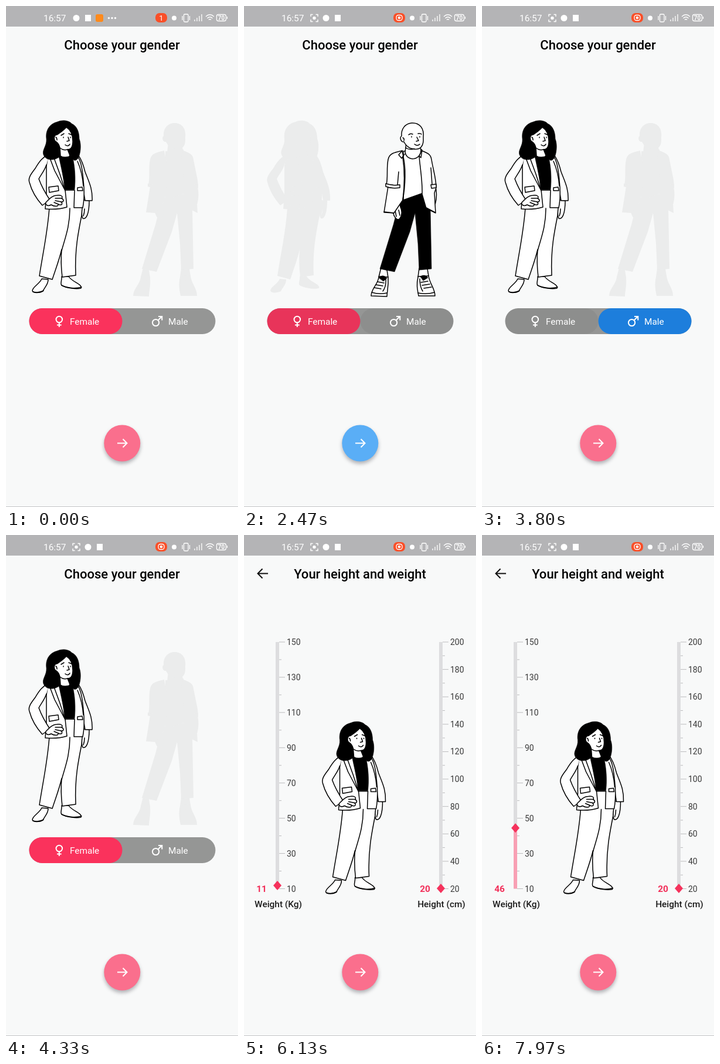
Animation, 396 px wide and 852 px high, one loop 8 s. Source, as an HTML page:

```html
<!DOCTYPE html>
<html lang="en">
<head>
<meta charset="utf-8">
<title>Gender and body measures</title>
<style>
  html, body { margin: 0; width: 100%; height: 100%; overflow: hidden; background: #f8f9f9; }
  svg { display: block; width: 100%; height: 100%; font: 15.4px Roboto, sans-serif; }
  .title { font-size: 22px; font-weight: 500; text-anchor: middle; }
  .caption { font-weight: 500; fill: #1c1c1c; text-anchor: middle; }
  .value { font-weight: 700; fill: #f2305a; text-anchor: middle; }
  .scale { font-size: 14px; fill: #3a3a3a; }
  .line { fill: none; stroke-width: 2; }
  .figure { --paper: #fff; --ink: #000; --line: #000; }
  .shade { --paper: #ebecec; --ink: #ebecec; --line: none; }
  .body, .solid, .ink { stroke: var(--line); stroke-width: 1.5; stroke-linejoin: round; stroke-linecap: round; }
  .body { fill: var(--paper); }
  .solid { fill: var(--ink); stroke-width: .6; }
  .ink { fill: none; }
  #fab { filter: drop-shadow(0 4px 3px rgba(90, 90, 100, .45)); }
</style>
</head>
<body>
<svg viewBox="0 0 396 852" preserveAspectRatio="none">
  <defs>
    <g id="woman">
      <path class="body" d="M61 464C57 473 46 477 45 484C46 489 58 488 63 485C66 478 72 474 72 465Z"/>
      <path class="body" d="M95 460C96 466 92 472 95 475C104 480 120 482 128 480C131 473 112 469 107 460Z"/>
      <path class="ink" d="M46 486C53 488 59 487 64 484M95 475C105 480 119 481 129 478" stroke-width="2"/>
      <path class="body" d="M74 343C71 385 63 420 57 459L79 465C86 444 91 431 95 414Q93 436 96 461L119 458C117 415 123 385 132 342L117 313H100Z"/>
      <path class="ink" d="M109 344C109 375 101 394 95 416"/>
      <path class="body" d="M131 330C131 344 127 356 131 361C137 364 142 353 142 331ZM134 345Q134 352 132 357"/>
      <path class="body" d="M122 252C129 260 132 270 135 282C141 298 148 310 147 331L135 331L130 300L119 262Z"/>
      <path class="body" d="M72 254L69 272V318L67 345Q88 347 104 342L101 313H117L116 343H131Q134 328 133 308C131 282 129 262 120 253L90 254Z"/>
      <path class="ink" d="M75 259L83 280L101 314M81 256L92 286L101 314M122 264Q130 282 132 306"/>
      <path class="body" d="M73 308L89 306L90 314L74 317ZM122 309L130 308L131 314H122Z"/>
      <path class="body" d="M74 252C62 256 55 268 50 276C44 284 37 292 40 300C44 315 53 329 62 339L75 330C67 318 60 305 56 294C60 286 66 280 69 270"/>
      <path class="body" d="M68 334C74 328 79 322 87 322C94 321 98 324 95 327C100 330 98 334 94 333C98 337 94 340 89 337C90 342 82 341 77 338C72 341 67 339 68 334Z"/>
      <path class="ink" d="M84 327L95 327M84 331L94 333M82 334L89 337"/>
      <path class="solid" d="M88 197C96 193 108 195 112 200C121 204 125 214 125 226C129 236 127 250 124 257C120 265 114 264 112 256H92C82 264 68 263 64 253C61 245 70 238 69 226C67 212 74 200 88 197Z"/>
      <path class="body" d="M103 206C98 212 93 215 87 219C81 219 81 229 86 231C89 233 91 237 92 241L93 255C98 259 108 259 109 254L105 244C112 244 114 238 114 230C114 219 111 211 103 206Z" stroke-width="1"/>
      <path class="ink" d="M94 220L99 217M107 217L112 219M106 223L108 229L104 230M101 236Q106 240 109 235M93 242Q98 246 105 244M85 223Q87 224 87 228" stroke-width="1.2"/>
      <path class="ink" d="M98 223v1M110 223v1" stroke-width="2.2"/>
      <path class="solid" d="M90 255Q102 259 113 254C118 273 119 295 117 312H100C99 294 94 274 90 255Z"/>
    </g>
    <g id="man">
      <path class="body" d="M234 445L230 461C229 473 217 481 217 493L244 494C244 485 247 478 246 462L244 449Z"/>
      <path class="body" d="M299 446L297 461C294 474 296 482 298 493L326 493C326 480 317 473 315 459L313 447Z"/>
      <path class="ink" d="M218 487Q231 491 244 488M230 460L246 461M228 469L239 471M225 474L237 476M222 479L234 481M242 464Q243 477 237 485M297 488Q312 491 325 487M297 460L315 459M302 470L314 468M304 475L317 473M307 480L320 478M300 464Q300 477 305 485"/>
      <path class="solid" d="M230 462Q237 455 244 463L238 468ZM301 460Q308 455 314 462L306 467Z"/>
      <path class="solid" d="M268 327L304 319L318 343L320 447L299 449L297 404L292 352L283 384L257 452L232 447L255 372L262 345Z"/>
      <path class="body" d="M247 305C250 320 248 338 254 344C253 354 259 364 264 363C269 359 271 350 267 342L261 305ZM258 348L260 358M264 347L266 356"/>
      <path class="body" d="M322 306L328 312Q330 330 324 343Z"/>
      <path class="body" d="M272 247L303 244L306 318L272 330Z"/>
      <path class="body" d="M303 246C313 250 319 252 320 261C323 279 328 294 328 309L325 318L327 352L311 344L304 320C305 297 300 272 299 255Z"/>
      <path class="body" d="M270 246C258 249 248 250 246 261C243 276 246 291 243 304L246 307L239 351L256 352L271 330C276 303 276 274 272 257Z"/>
      <path class="body" d="M242 302Q254 306 266 304L266 309Q252 311 242 307ZM319 304L328 303V309L320 310Z"/>
      <path class="ink" d="M264 282L262 304M271 257Q276 292 271 330M270 246L264 253L269 259L274 252M304 245L302 258L297 253M319 275L321 303M239 350L256 352M311 343L326 351" stroke-width="1.8"/>
      <path class="body" d="M277 232L275 249C278 264 300 264 302 246L301 239Z"/>
      <path class="body" d="M286 199C275 200 268 209 269 221C265 224 268 232 273 231Q278 241 288 243C302 246 307 237 306 224C308 207 299 198 286 199Z"/>
      <path class="ink" d="M276 241Q281 245 291 243M271 224Q274 225 273 229M281 219Q284 216 288 218M297 217Q301 216 303 218M295 223L298 229L294 230M291 235Q296 239 300 235" stroke-width="1.2"/>
      <path class="ink" d="M286 222v1M300 222v1" stroke-width="2.2"/>
    </g>
  </defs>

  <rect width="396" height="852" fill="#f8f9f9"/>
  <g id="choosePage">
    <text class="title" x="198" y="74">Choose your gender</text>
    <use id="him" href="#man"/>
    <rect x="39.5" y="514" width="318" height="44" rx="22" fill="#959695"/>
    <rect id="femalePill" x="39.5" y="514" width="159" height="44" rx="22"/>
    <rect id="malePill" x="198.5" y="514" width="159" height="44" rx="22"/>
    <g fill="#fff">
      <text x="109" y="542">Female</text>
      <text x="277" y="542">Male</text>
    </g>
    <path class="line" stroke="#fff" d="M85.5 533a5.3 5.3 0 1 0 10.6 0a5.3 5.3 0 1 0-10.6 0M90.8 538.5V546M87 542.5H94.6M250 538.5a5.6 5.6 0 1 0 11.2 0a5.6 5.6 0 1 0-11.2 0M259.5 534.5L266 528M260 528H266.3V534.5"/>
  </g>

  <g id="measurePage">
    <rect width="396" height="852" fill="#f8f9f9"/>
    <path class="line" stroke="#111" d="M41 65.5H24M31.5 57.5L23.5 65.5L31.5 73.5"/>
    <text class="title" x="198" y="74">Your height and weight</text>
    <g id="rulers"></g>
    <rect id="fill" x="54" width="6" fill="#f8a0b4"/>
    <path id="marker" d="M0-8L7 0L0 8L-7 0Z" fill="#f5325c"/>
    <path d="M336 593L343 601L336 609L329 601Z" fill="#f5325c"/>
    <text id="weight" class="value" x="30" y="607"></text>
    <text class="value" x="309" y="607">20</text>
    <text class="caption" x="58.5" y="633">Weight (Kg)</text>
    <text class="caption" x="337" y="633">Height (cm)</text>
  </g>

  <use id="her" href="#woman"/>
  <circle id="fab" cx="198.3" cy="743.5" r="31"/>
  <path class="line" stroke="#fff" d="M190 743.5H206M199.5 736.5L206.5 743.5L199.5 750.5"/>

  <rect width="396" height="35" fill="#b4b4b6"/>
  <g fill="#fff">
    <text x="64" y="26">16:57</text>
    <g id="notices">
      <circle cx="140" cy="20.5" r="5.5"/>
      <rect x="155" y="15" width="10" height="11"/>
    </g>
    <g id="moreNotices">
      <rect x="153" y="14" width="13" height="13" rx="3" fill="#ff8a1c"/>
      <circle cx="175.5" cy="20.5" r="1.7"/><circle cx="181" cy="20.5" r="1.7"/><circle cx="186.5" cy="20.5" r="1.7"/>
    </g>
    <g id="recordNotice">
      <circle cx="120" cy="20.5" r="2.7"/>
      <path fill="none" stroke="#fff" stroke-width="1.4" d="M114 18V14.5H117.5M122.5 14.5H126V18M126 23V26.5H122.5M117.5 26.5H114V23"/>
    </g>
    <rect x="255" y="12" width="20" height="16" rx="7" fill="#f94f28"/>
    <text id="countdown" x="265" y="25" font-size="13" text-anchor="middle">1</text>
    <g id="recording" fill="none" stroke="#fff" stroke-width="1.3">
      <rect x="260" y="15.5" width="10" height="9" rx="3.5"/>
      <circle cx="265" cy="20" r="1.7" fill="#fff"/>
    </g>
    <circle cx="287" cy="20.5" r="4"/>
    <g fill="none" stroke="#fff" stroke-width="1.3">
      <rect x="303.5" y="14" width="7.5" height="13" rx="1.5"/>
      <path d="M301 17V24M313.5 17V24M322 23V26M326 20V26M330 17V26M334 14V26"/>
      <path d="M341 18Q348 11.5 355 18M343.5 21Q348 16.5 352.5 21M346 23.5Q348 21.5 350 23.5"/>
      <rect x="359.5" y="14.5" width="16" height="11" rx="3"/>
      <path d="M377.5 18V22"/>
    </g>
    <text x="367.5" y="24" font-size="10" font-weight="700" text-anchor="middle">70</text>
  </g>
  <rect y="851" width="396" height="1" fill="#c4c4c6"/>
</svg>
<script>
  const LOOP = 8000, TOP = 182, BOTTOM = 601.5;
  const RED = [250, 50, 92], BLUE = [24, 132, 236];
  const $ = id => document.getElementById(id);
  const clamp = v => Math.min(1, Math.max(0, v));
  const progress = (t, from, to) => clamp((t - from) / (to - from));
  const ease = p => p * p * (3 - 2 * p);
  const show = (id, on) => $(id).style.display = on ? '' : 'none';

  function ruler(x, min, max) {
    const steps = (max - min) / 10, gap = (BOTTOM - TOP) / steps;
    let out = `<rect x="${x - 3}" y="${TOP}" width="6" height="${BOTTOM - TOP}" fill="#dddddf"/>`;
    for (let i = 0; i <= steps; i++) {
      const y = BOTTOM - i * gap, major = i % 2 === 0;
      out += `<path d="M${x + 3} ${y}h${major ? 10 : 4}" stroke="#bcbcbe"/>`;
      if (major) out += `<text class="scale" x="${x + 16}" y="${y + 5}">${min + i * 10}</text>`;
    }
    return out;
  }
  $('rulers').innerHTML = ruler(57, 10, 150) + ruler(336, 20, 200);

  // Pills fade to transparent black, so they darken on the way.
  function paintPill(id, color, amount) {
    $(id).setAttribute('fill', `rgb(${color.map(c => Math.round(c * amount))})`);
    $(id).setAttribute('fill-opacity', amount);
  }

  const dragged = t => 31.2 * ease(progress(t, 6930, 7640)) + 3.2 * progress(t, 7770, 7970);

  function render(t) {
    const male = t >= 830 && t < 2970, started = t >= 330;
    $('her').setAttribute('class', male ? 'figure shade' : 'figure');
    $('him').setAttribute('class', male ? 'figure' : 'figure shade');
    $('fab').setAttribute('fill', male ? '#5aaef6' : '#fa6f8d');

    const selected = progress(t, 2458, 2708) - progress(t, 3788, 4038);
    paintPill('femalePill', RED, 1 - selected);
    paintPill('malePill', BLUE, selected);

    show('recordNotice', started);
    show('recording', started);
    show('countdown', !started);
    show('moreNotices', !started);
    $('notices').setAttribute('transform', `translate(${started ? 0 : -20})`);

    // The next page fades in while the woman travels to its centre.
    const entered = progress(t, 5080, 6080), travel = ease(entered);
    $('measurePage').setAttribute('opacity', entered);
    $('her').setAttribute('transform', `translate(${94.5 * travel} ${122.5 * travel})`);

    // The marker trails slightly behind the number while dragged.
    const start = t >= 6130 ? 11.8 : 10;
    const y = BOTTOM - (start + dragged(t - 110) - 10) * (BOTTOM - TOP) / 140;
    $('marker').setAttribute('transform', `translate(57 ${y})`);
    $('fill').setAttribute('y', y);
    $('fill').setAttribute('height', BOTTOM - y);
    $('weight').textContent = Math.floor(start + dragged(t));
  }

  function frame() {
    render(performance.now() % LOOP);
    requestAnimationFrame(frame);
  }
  frame();
</script>
</body>
</html>
```
